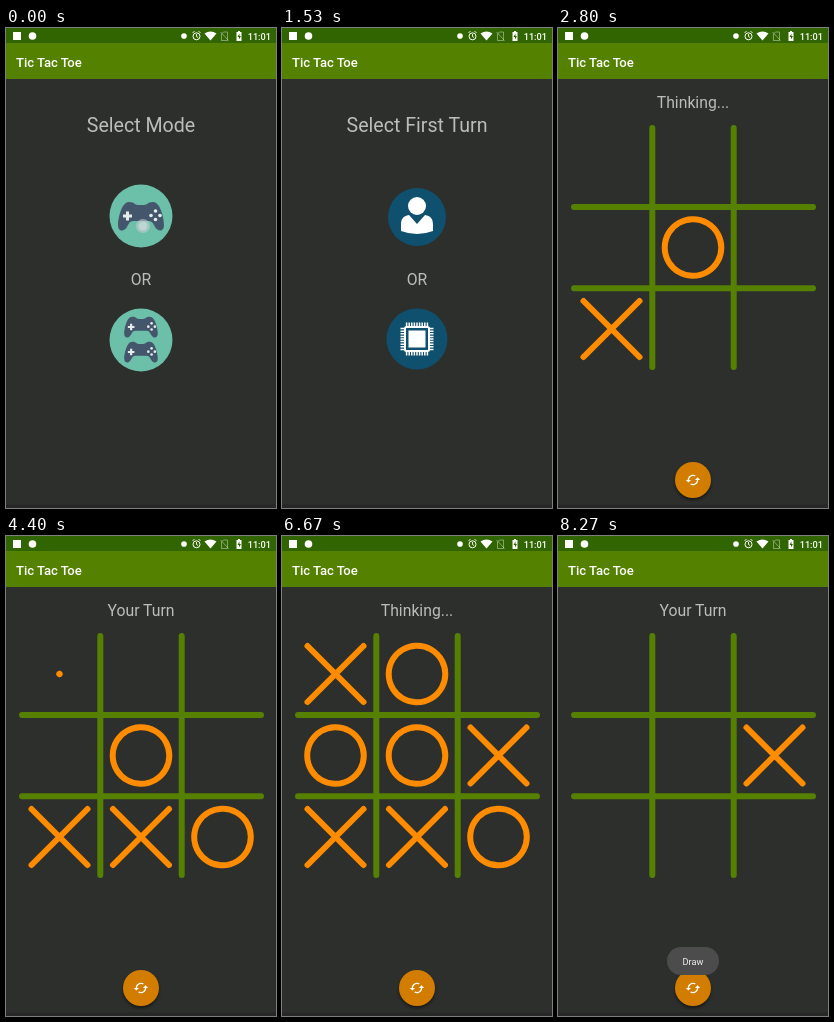
Animation of 270 by 480 pixels, one loop 8.34 s. Source, as an HTML page:

```html
<!DOCTYPE html>
<html lang="en">
<head>
<meta charset="utf-8">
<title>Tic Tac Toe</title>
<style>
  html, body { margin: 0; width: 100%; height: 100%; overflow: hidden; background: #2d2f2d; }
  svg { display: block; width: 100vw; height: 100vh; }
  text { font-family: Roboto, Arial, sans-serif; fill: #bbbcbb; text-anchor: middle; }
  .head { font-size: 19.6px; }
  .mid { font-size: 15.75px; }
  .line { fill: none; stroke-width: 6; stroke-linecap: round; }
  .bg { fill: #2d2f2d; }
</style>
</head>
<body>
<svg viewBox="0 0 270 480">
  <defs>
    <g id="pad">
      <path fill="#44566b" d="M-12-14C-6-14-7-11-3-11H3C7-11 6-14 12-14C20-14 23 4 23 9C23 16 17 16 14 11C12 7 11 5 7 5H-7C-11 5-12 7-14 11C-17 16-23 16-23 9C-23 4-20-14-12-14Z"/>
      <path stroke="#e6ecec" stroke-width="3" d="M-18 0h9M-13.500-4.500v9"/>
      <g fill="#e6ecec">
        <circle cx="14.500" cy="-5" r="1.800"/><circle cx="10" cy="-.5" r="1.800"/>
        <circle cx="19" cy="-.5" r="1.800"/><circle cx="14.500" cy="3.500" r="1.800"/>
      </g>
    </g>
    <g id="touch">
      <circle r="7" fill="#c3ccd0" opacity=".6"/>
      <circle r="4.500" fill="#dde3e5" opacity=".5"/>
    </g>
    <filter id="soft" x="-50%" y="-50%" width="200%" height="200%"><feGaussianBlur stdDeviation="1.800"/></filter>
  </defs>

  <g class="screen">
    <rect class="bg" width="270" height="520"/>
    <text class="head" x="135" y="104">Select Mode</text>
    <text class="mid" x="135" y="257">OR</text>
    <circle cx="135" cy="188" r="31.500" fill="#6cbfa9"/>
    <circle cx="135" cy="312" r="31.500" fill="#6cbfa9"/>
    <use href="#pad" x="135" y="188"/>
    <use href="#pad" transform="translate(135 299) scale(.73)"/>
    <use href="#pad" transform="translate(135 324) scale(.73)"/>
  </g>

  <g class="screen">
    <rect class="bg" width="270" height="520"/>
    <text class="head" x="135" y="104">Select Sign</text>
    <text class="mid" x="135" y="257">OR</text>
    <g class="line" stroke="#f7931a">
      <circle cx="135" cy="188" r="21" stroke-width="4"/>
      <path d="M111 287.500l48 48M159 287.500l-48 48"/>
    </g>
  </g>

  <g class="screen">
    <rect class="bg" width="270" height="520"/>
    <text class="head" x="135" y="104">Select First Turn</text>
    <text class="mid" x="135" y="257">OR</text>
    <circle cx="135" cy="189" r="29" fill="#10506f"/>
    <circle cx="135" cy="178" r="9" fill="#fff"/>
    <path fill="#fff" d="M127 187L135 196L143 187C149 188 151 191 151 197V203Q143 206 135 206T119 203V197C119 191 121 188 127 187Z"/>
    <circle cx="135" cy="311" r="30.500" fill="#10506f"/>
    <g fill="none" stroke="#fff">
      <path id="pins" stroke-width="1.500"/>
      <rect x="123" y="299" width="24" height="24" rx="1.500" stroke-width="2"/>
    </g>
    <rect x="126.500" y="302.500" width="17" height="17" fill="#fff"/>
  </g>

  <g class="screen">
    <rect class="bg" width="270" height="520"/>
    <text class="mid" id="status" x="135" y="80"></text>
    <path class="line" stroke="#558000" d="M94.300 100V339M175.700 100V339M16 179H255M16 260.300H255"/>
    <g class="line" id="marks" stroke="#ff8c00"></g>
    <circle cx="135" cy="454" r="18" opacity=".5" filter="url(#soft)"/>
    <circle cx="135" cy="452" r="18" fill="#d27d00"/>
    <path fill="#fff" transform="translate(127.100 444.100) scale(.656)" d="M19 8l-4 4h3c0 3.310-2.690 6-6 6-1.010 0-1.970-.25-2.800-.7l-1.460 1.460C8.970 19.540 10.430 20 12 20c4.420 0 8-3.580 8-8h3zM6 12c0-3.310 2.690-6 6-6 1.010 0 1.970.25 2.800.7l1.460-1.460C15.030 4.460 13.570 4 12 4c-4.420 0-8 3.580-8 8H1l4 4 4-4z"/>
    <g id="toast">
      <rect x="109" y="411" width="52" height="28" rx="14" fill="#4b4c4b"/>
      <text x="135" y="428.500" font-size="9.200" style="fill:#f0f0f0">Draw</text>
    </g>
  </g>

  <use href="#touch" id="tap1" x="137" y="198"/>
  <use href="#touch" id="tap2" x="132" y="201"/>

  <rect y="476.500" width="270" height="3.500" fill="#262726"/>
  <rect width="270" height="51" fill="#548100"/>
  <rect width="270" height="15" fill="#306502"/>
  <text x="10" y="38.500" font-size="13.100" font-weight="500" style="fill:#fff;text-anchor:start">Tic Tac Toe</text>
  <text x="265" y="11.700" font-size="9.200" font-weight="500" style="fill:#fff;text-anchor:end">11:01</text>
  <g fill="#fff">
    <rect x="7" y="4" width="8" height="8"/>
    <circle cx="26.500" cy="8" r="3.800"/>
    <circle cx="178" cy="8" r="2.800"/>
    <path d="M198.500 5.500Q204.500 1.500 210.500 5.500L204.500 12.500Z"/>
    <path d="M231 4h1V3h2v1h1.500v9H230.500V4Z"/>
  </g>
  <path d="M233.500 5.500l-2 3.500h1.500v2.500l2-3.500h-1.500Z" fill="#306502"/>
  <g fill="none" stroke="#fff">
    <circle cx="190.500" cy="8.300" r="3.500"/>
    <path stroke-width=".9" d="M190.500 6v2.500l1.500 1M186.500 5l2-2M194.500 5l-2-2"/>
    <path opacity=".4" d="M215.500 6l2-2h4v8.500h-6ZM214.500 4l8 8.500"/>
  </g>
</svg>
<script>
const LOOP = 8340, RESET = 7925, TOAST = 7330;
const screenStarts = [-1000, 230, 900, 1640];
const turns = [2065, 2865, 3595, 4390, 4995, 5725, 6265, 7065];
// [sign, cell, start]
const moves = [
  ['X', 6, 1660], ['O', 4, 2065], ['X', 7, 2925], ['O', 8, 3595], ['X', 0, 4390],
  ['O', 3, 4995], ['X', 5, 5795], ['O', 1, 6265], ['X', 2, 7065], ['X', 5, 8000]
];

const $ = id => document.getElementById(id);
const clamp = v => Math.max(0, Math.min(1, v));
const smooth = k => (1 - Math.cos(Math.PI * k)) / 2;
const show = (el, on) => el.setAttribute('visibility', on ? 'visible' : 'hidden');

const screens = [...document.querySelectorAll('.screen')];

let pins = '';
for (let i = -4; i <= 4; i++) {
  const d = i * 2.6;
  pins += `M${135 + d} 294.500v4M${135 + d} 323.500v4M118.500 ${311 + d}h4M147.500 ${311 + d}h4`;
}
$('pins').setAttribute('d', pins);

const marks = moves.map(([sign, cell, start]) => {
  const el = document.createElementNS('http://www.w3.org/2000/svg', 'path');
  const x = 53.5 + cell % 3 * 81.5, y = 138 + Math.floor(cell / 3) * 81.5;
  $('marks').append(el);
  return { el, sign, x, y, start, end: start < RESET ? RESET : LOOP };
});

function markPath({ sign, x, y }, k) {
  if (sign === 'X') {
    const r = Math.max(.01, 28 * k);
    return `M${x - r} ${y - r}L${x + r} ${y + r}M${x + r} ${y - r}L${x - r} ${y + r}`;
  }
  const r = 28.3, a = Math.max(.001, k * 2 * Math.PI - .001);
  return `M${x + r} ${y}A${r} ${r} 0 ${+(a > Math.PI)} 1 ${x + r * Math.cos(a)} ${y + r * Math.sin(a)}`;
}

function draw(t) {
  screens.forEach((el, i) => {
    const age = t - screenStarts[i];
    const rise = 20 * (1 - clamp(age / 220)) ** 3;
    el.setAttribute('opacity', clamp(age / 180));
    el.setAttribute('transform', `translate(0 ${rise})`);
    show(el, age > 0);
  });
  for (const m of marks) {
    const on = t >= m.start && t < m.end;
    show(m.el, on && t > screenStarts[3]);
    if (on) m.el.setAttribute('d', markPath(m, smooth(clamp((t - m.start) / (m.sign === 'X' ? 210 : 330)))));
  }
  const thinking = turns.filter(s => t >= s).length % 2;
  $('status').textContent = thinking ? 'Thinking...' : 'Your Turn';
  $('toast').setAttribute('opacity', clamp((t - TOAST) / 250));
  show($('tap1'), t < 130);
  show($('tap2'), t >= 590 && t < 760);
}

let origin;
function tick(now) {
  origin ??= now;
  draw((now - origin) % LOOP);
  requestAnimationFrame(tick);
}
draw(0);
requestAnimationFrame(tick);
</script>
</body>
</html>
```
